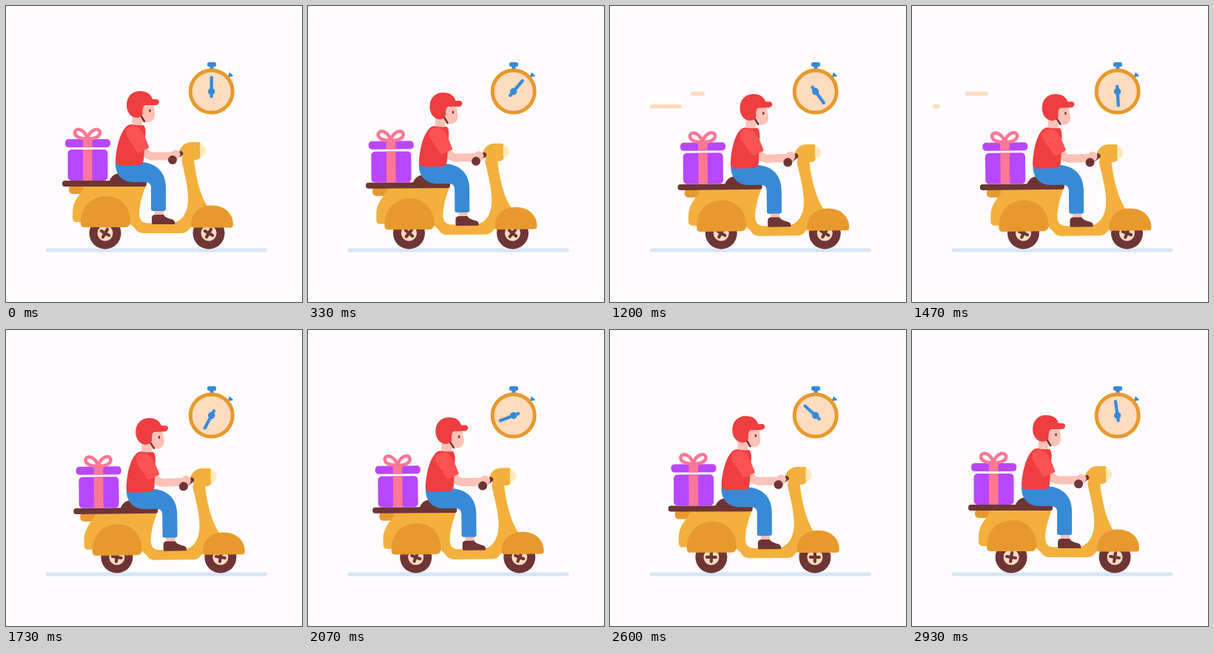
Recreate the animation shown at these times as an HTML page. Size 400 by 400 pixels, loop 3 s.

```html
<!DOCTYPE html>
<html lang="en">
<head>
<meta charset="utf-8">
<title>Scooter delivery</title>
<style>
html, body { margin: 0; height: 100%; overflow: hidden; background: #fefcfe; }
svg { display: block; width: 100vw; height: 100vh; }
.yellow { fill: #f4b03c; }
.orange { fill: #e8992d; }
.brown { fill: #6f3534; }
.red { fill: #f03d40; }
.skin { fill: #fcc1b7; }
.blue { fill: #388ad6; }
.purple { fill: #b947ff; }
.pink { fill: #fd7797; }
.peach { fill: #fedcc0; }
.line { fill: none; stroke-linecap: round; stroke-linejoin: round; }
</style>
</head>
<body>
<svg viewBox="0 0 400 400">
  <defs>
    <g id="wheel">
      <circle class="brown" r="21.5"/>
      <circle class="peach" r="10.5"/>
    </g>
    <path id="spokes" class="line" d="M-6 0H6M0-6V6" stroke="#6f3534" stroke-width="4.2"/>
  </defs>

  <rect x="53.700" y="327.500" width="299" height="5" rx="2.500" fill="#d7e5f5"/>
  <rect class="peach dash" y="133" height="5.500" rx="2"/>
  <rect class="peach dash" y="115.800" height="5.500" rx="2"/>

  <!-- Stopwatch -->
  <rect class="blue" x="272" y="76" width="12" height="6" rx="2.500"/>
  <rect class="blue" x="275.500" y="79" width="5" height="8"/>
  <path class="blue" d="M302 89.500l5 4.500q-1 2-3.500 1.500l-4 1z"/>
  <circle cx="277.700" cy="115.500" r="28.500" fill="#fedcc0" stroke="#e8992d" stroke-width="5"/>
  <g id="hand">
    <path class="line" d="M0-19V7" stroke="#388ad6" stroke-width="4.200"/>
    <circle class="blue" r="4.700"/>
  </g>

  <g id="scooter">
    <g transform="translate(134 307)"><use href="#wheel"/><use class="spin" href="#spokes"/></g>
    <g transform="translate(274 307)"><use href="#wheel"/><use class="spin" href="#spokes"/></g>

    <g id="frame">
      <rect class="orange" x="85" y="242" width="40" height="12" rx="5"/>
      <path class="yellow" d="M90 287V278C91 258 106 252 105 243H189C184 255 180 270 180 281C180 289 184 293.500 192 293.500H222C238 293 247 279 246 257C245 238 240 222 237 207H254C256 228 262 256 273 272L262 296Q250 297 247 302Q244 307 236 307H186Q177 307 174 300L165 292H96Q90 292 90 287Z"/>
      <g id="fenders" class="orange">
        <path d="M101 294C101 271 115 257 136 257C156 257 168 273 168 291Q168 299 161 299H106Q101 299 101 294Z"/>
        <path d="M250 296C250 280 261 269.500 278 269.500C296 269.500 307 281 307 295Q307 299.500 303 299.500H253Q250 299.500 250 296Z"/>
      </g>
      <path class="brown" d="M139 238Q143 226 155 226H174Q188 228 190 238Z"/>
      <rect class="brown" x="76" y="236" width="114" height="8" rx="3.500"/>

      <rect class="purple" x="83.500" y="194" width="54" height="42" rx="5"/>
      <rect class="purple" x="80" y="180" width="61" height="11" rx="4.500"/>
      <path class="pink" d="M104 180h12.500v11h-12.500zM104 194h12.500v42h-12.500z"/>
      <path class="line" d="M110 179C102 180 92 177 93 170C95 164 106 166 110 179C114 166 125 164 127 170C128 177 118 180 110 179Z" stroke="#fd7797" stroke-width="4.500"/>

      <path class="skin" d="M201 274h12v10h-12z"/>
      <path class="brown" d="M197 293V287Q197 282 202 282H213C216 287 222 287 226 289Q229 291 228 295H199Q197 295 197 293Z"/>

      <path class="yellow" d="M234 196Q239 184 250 184H260Q263 184 263 188V202Q263 207 257 208H238Q239 200 234 196Z"/>
      <path d="M262 187H264Q270 189 270 195.500Q270 201 264 203H262Z" fill="#fde9bd"/>
      <path class="line" d="M230 204L236 199.500" stroke="#6f3534" stroke-width="6.500"/>

      <path class="blue" d="M148 211H184C205 213 216 226 216 245V274Q216 277 213 277H199Q196 277 196 274V246Q196 238 188 238H172C156 238 147 226 148 211Z"/>
      <g id="rider">
        <path class="skin" d="M171 147h13v15q-7 4-14 0z"/>
        <path class="line" d="M182 185Q186 201 197 203H229" stroke="#fcc1b7" stroke-width="11"/>
        <circle class="skin" cx="229" cy="201" r="6.500"/>
        <path class="red" d="M169 160Q178 162 186 161Q190 166 188 178L186 208Q185 214 180 215H154Q147 214 148 207C149 193 153 175 160 166Q164 160 169 160Z"/>
        <path d="M163 166Q168 160 177 163C186 168 189 180 193 190Q194 192 191 193L180 198Q177 199 176 196C172 186 159 176 163 166Z" fill="#fd5253"/>
        <path class="skin" d="M180 132H199L201 146Q201 157 191 157H186Q181 155 180 147Z"/>
        <ellipse cx="194.500" cy="141.500" rx="1.300" ry="2" fill="#6f3534"/>
        <path class="line" d="M181 146L187 156" stroke="#6f3534" stroke-width="2.500"/>
        <path class="red" d="M163 134C163 122 171 115 181 115C190 115 196 119 198 126H204Q207 127 207 130Q206 134 202 134H188Q185 135 184.500 141V146Q182 151 176 151C168 150 163 143 163 134Z"/>
      </g>
      <circle class="brown" cx="225" cy="208" r="6"/>
    </g>
  </g>
</svg>
<script>
const LOOP = 3000;
const get = id => document.getElementById(id);
const all = selector => [...document.querySelectorAll(selector)];
const place = (el, value) => el.setAttribute("transform", value);
const ease = u => (1 - Math.cos(Math.PI * Math.min(1, Math.max(0, u)))) / 2;

// Linear interpolation through [time, value] pairs
function track(keys, t) {
  const i = keys.findIndex(key => key[0] > t);
  const [t0, a] = keys[i - 1], [t1, b] = keys[i];
  return a + (b - a) * (t - t0) / (t1 - t0);
}

const squat = [[0, 0], [330, .55], [800, .8], [1200, 1], [1730, 1], [2330, .6], [2900, 0], [3001, 0]];
const trails = [{ start: 607, length: 124 }, { start: 940, length: 80 }];
const dashes = all(".dash");
const spokes = all(".spin");

function draw(t) {
  const drive = ease(t / 1300) - ease((t - 1550) / 1450);
  const sink = track(squat, t);
  place(get("scooter"), `translate(${16.5 * drive} 0)`);
  place(get("frame"), `translate(0 ${3 * sink}) rotate(${-.6 * sink} 260 300)`);
  place(get("fenders"), `translate(0 ${1.3 * sink})`);
  place(get("rider"), `rotate(${-1.3 * drive * drive} 182 225)`);
  place(get("hand"), `translate(277.7 115.5) rotate(${t / LOOP * 360})`);
  spokes.forEach(el => place(el, `rotate(${30 + t / LOOP * 900})`));

  dashes.forEach((el, i) => {
    const { start, length } = trails[i];
    const age = Math.max(0, t - start);
    const head = Math.min(length, .165 * age);
    const tail = .0925 * age + .13 * Math.max(0, age - 600);
    el.setAttribute("x", 152 - head);
    el.setAttribute("width", Math.max(0, head - tail));
  });
}

function tick() {
  draw(performance.now() % LOOP);
  requestAnimationFrame(tick);
}
tick();
</script>
</body>
</html>
```
